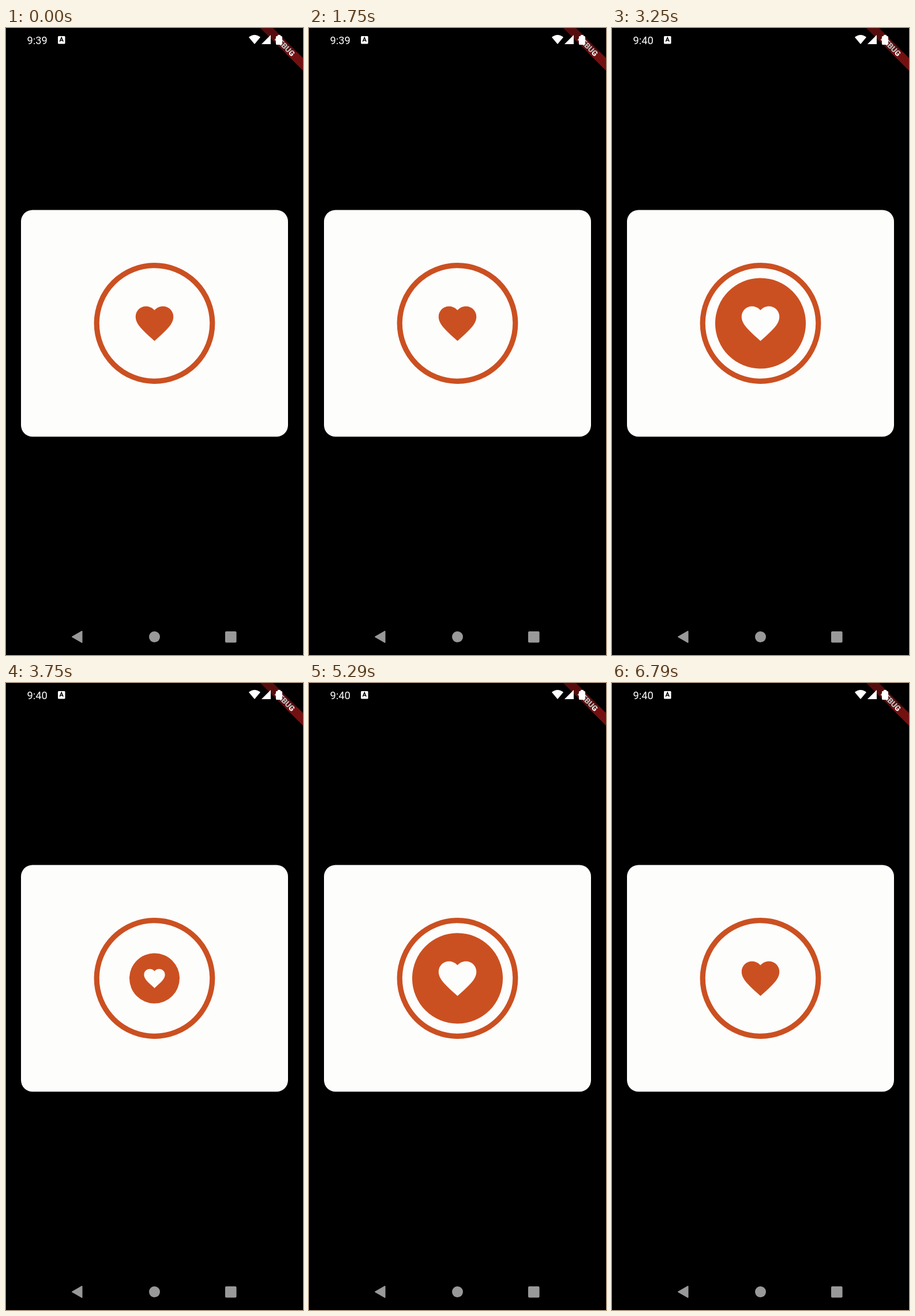
An HTML page that plays this animation: 515 by 1087 pixels, repeating every 6.92 s.

```html
<!DOCTYPE html>
<html lang="en">
<head>
<meta charset="utf-8">
<title>Like button</title>
<style>
  html, body { margin: 0; width: 100%; height: 100%; overflow: hidden; background: #000; }
  svg { display: block; width: 515px; height: 1087px; }
  text { font-family: Roboto, sans-serif; fill: #fff; }
  .accent { fill: #cb5021; }
  .paper { fill: #fdfdfc; }
</style>
</head>
<body>
<svg viewBox="0 0 515 1087">
  <defs>
    <path id="heart" transform="scale(3.275) translate(-12 -12)"
      d="M12 21.35l-1.45-1.32C5.4 15.36 2 12.28 2 8.5 2 5.42 4.42 3 7.5 3c1.74 0 3.41.81 4.5 2.09C13.09 3.81 14.76 3 16.5 3 19.58 3 22 5.42 22 8.5c0 3.78-3.4 6.86-8.55 11.54L12 21.35z"/>
  </defs>
  <rect width="515" height="1087"/>

  <!-- Corner banner -->
  <g transform="translate(515 0) rotate(45)">
    <rect x="-60" y="36.7" width="120" height="15.7" fill="#b71c1c" fill-opacity=".63"/>
    <text y="49.3" font-size="13.4" font-weight="900" text-anchor="middle">DEBUG</text>
  </g>
  <rect width="515" height="42" fill-opacity=".25"/>

  <!-- Status bar -->
  <text id="clock" x="36.6" y="27.6" font-size="18.3">9:39</text>
  <g fill="#fff">
    <rect x="90" y="14" width="12.5" height="13.5" rx="1.5"/>
    <path d="M431 28L421 16Q431 8 441 16Z"/>
    <path d="M459 12V28H443Z"/>
    <path d="M471 12h5v2h1.5q1.5 0 1.5 1.5v12q0 1.5-1.5 1.5h-8q-1.5 0-1.5-1.5v-12q0-1.5 1.5-1.5h1.5z"/>
  </g>
  <path d="M93.2 23.5L96.2 16.5L99.2 23.5M94.3 21.4h3.8" fill="none" stroke="#000" stroke-width="1.5"/>

  <!-- Card -->
  <rect class="paper" x="26" y="315.5" width="463" height="393" rx="20"/>
  <g transform="translate(257.5 512)">
    <circle r="100.3" fill="none" stroke="#cb5021" stroke-width="9.2"/>
    <use href="#heart" class="accent"/>
    <g id="badge">
      <circle class="accent" r="78.6"/>
      <use href="#heart" class="paper"/>
    </g>
  </g>

  <!-- Navigation bar -->
  <g fill="#999" stroke="#999" stroke-linejoin="round">
    <path d="M115 1055.5L131.5 1046V1065Z" stroke-width="2"/>
    <circle cx="257.5" cy="1055.5" r="9.5" stroke="none"/>
    <rect x="380" y="1046" width="19.6" height="19.6" rx="2" stroke="none"/>
  </g>
</svg>
<script>
  const LOOP = 6920, STEP = 1000 / 24, DURATION = 500, MINUTE = 2830;
  const taps = [
    { at: 2035, liked: true },
    { at: 3315, liked: false },
    { at: 4350, liked: true },
    { at: 5402, liked: false },
  ];
  const badge = document.getElementById('badge');
  const clock = document.getElementById('clock');

  const bezier = (a, b, s) =>
    3 * a * s * (1 - s) ** 2 + 3 * b * s * s * (1 - s) + s ** 3;

  // Ease out with overshoot: cubic-bezier(.175, .885, .32, 1.275)
  function easeOutBack(x) {
    if (x <= 0 || x >= 1) return x <= 0 ? 0 : 1;
    let lo = 0, hi = 1;
    for (let i = 0; i < 24; i++) {
      const mid = (lo + hi) / 2;
      if (bezier(.175, .32, mid) < x) lo = mid; else hi = mid;
    }
    return bezier(.885, 1.275, lo);
  }

  function badgeScale(t) {
    const tap = taps.filter(({ at }) => at <= t).pop();
    if (!tap) return 0;
    const progress = Math.min(1, (t - tap.at) / DURATION);
    return easeOutBack(tap.liked ? progress : 1 - progress);
  }

  function draw(t) {
    const held = Math.floor((t + 5) / STEP) * STEP;
    const scale = badgeScale(held);
    badge.setAttribute('transform', `scale(${scale.toFixed(4)})`);
    badge.style.display = scale > 0 ? '' : 'none';
    clock.textContent = held < MINUTE ? '9:39' : '9:40';
  }

  const start = performance.now();
  function tick() {
    draw((performance.now() - start) % LOOP);
    requestAnimationFrame(tick);
  }
  tick();
</script>
</body>
</html>
```
